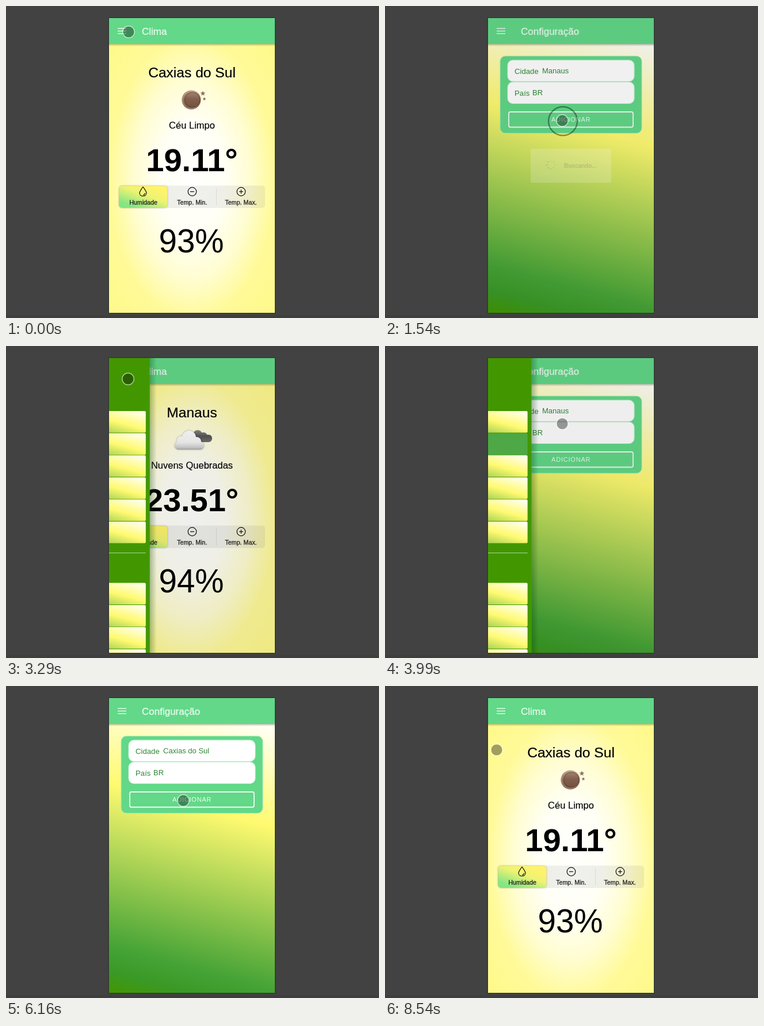
Animation, 648 px wide and 542 px high, one loop 8610 ms. Source, as an HTML page with a canvas:

```html
<!DOCTYPE html>
<html lang="pt-BR">
<head>
<meta charset="utf-8">
<title>Clima</title>
<style>
html, body { margin: 0; width: 100%; height: 100%; overflow: hidden; background: #424242; }
canvas { display: block; }
</style>
</head>
<body>
<canvas id="stage" width="648" height="542"></canvas>
<script>
const ctx = document.getElementById('stage').getContext('2d');
const LOOP = 8610, STEP = 70;
const L = 179, T = 21, W = 288, H = 512, MID = 323, TOP = 66;
const SANS = '"Liberation Sans", Arial, sans-serif';
const GREEN = '#62d888', DEEP = '#429700', INK = '#2f8a35';
const MENU_W = 243;

const clamp = v => Math.max(0, Math.min(1, v));
const ease = v => { v = clamp(v); return v * v * (3 - 2 * v); };
const ramp = (t, from, len) => ease((t - from) / len);
const fade = (t, a, b) => clamp((t - a) / 100) * (1 - clamp((t - b) / 150));
const last = (list, t) => list.filter(e => e[0] <= t).pop();

// time, x, y; a time without a place hides the pointer
const path = [
  [0, 213, 45], [70, 203, 44], [140, 210, 60], [280, 290, 171], [350, 290, 171],
  [490, 310, 135], [560, 312, 115], [630],
  [1190, 330, 160], [1400, 308, 199], [1540, 308, 199], [1820, 350, 190],
  [2030, 324, 325], [2170, 324, 325], [2310, 410, 325], [2450, 410, 325],
  [2660, 238, 325], [2800, 238, 325], [3080, 203, 44], [3220, 203, 44],
  [3570, 290, 171], [3810, 290, 171], [3990, 308, 135], [4130, 312, 114],
  [4270, 312, 114], [4280],
  [5880, 330, 150], [6160, 308, 199], [6300, 308, 199], [6720, 357, 187],
  [7070, 324, 325], [7210, 324, 325], [7350, 410, 325], [7490, 410, 325],
  [7700, 238, 325], [7840, 238, 325], [8190, 220, 215], [8540, 194, 111], [8610, 213, 45]
];
const clicks = [70, 350, 560, 1470, 2100, 2310, 2730, 3150, 3780, 4200, 6230, 7140, 7420, 7770];
const tabs = [[-999, 0], [2170, 1], [2380, 2], [2800, 0], [7210, 1], [7490, 2], [7840, 0]];
const views = [[0, 'clima'], [385, 'config'], [1610, 'clima'], [3814, 'config'], [6510, 'clima']];
const drawers = [[100, 385, 150], [3190, 3814, 280]];
const loads = [[1520, 1700], [6300, 6600]];
const places = {
  caxias: { name: 'Caxias do Sul', sky: 'Céu Limpo', temp: '19.11°', values: ['93%', '19°', '19°'], icon: moon },
  manaus: { name: 'Manaus', sky: 'Nuvens Quebradas', temp: '23.51°', values: ['94%', '23°', '24°'], icon: clouds }
};

function text(str, x, y, size, color, o = {}) {
  ctx.font = `${o.weight || 400} ${size}px ${SANS}`;
  ctx.textAlign = o.align || 'left';
  ctx.letterSpacing = (o.space || 0) + 'px';
  ctx.fillStyle = color;
  ctx.fillText(str, x, y);
  if (o.thick) {
    ctx.strokeStyle = color;
    ctx.lineWidth = o.thick;
    ctx.strokeText(str, x, y);
  }
  ctx.letterSpacing = '0px';
}

function box(x, y, w, h, r, fill, stroke, lw = 1) {
  ctx.beginPath();
  ctx.roundRect(x, y, w, h, r);
  if (fill) { ctx.fillStyle = fill; ctx.fill(); }
  if (stroke) { ctx.strokeStyle = stroke; ctx.lineWidth = lw; ctx.stroke(); }
}

function disc(x, y, r, fill) {
  ctx.beginPath();
  ctx.arc(x, y, r, 0, 7);
  ctx.fillStyle = fill;
  ctx.fill();
}

function ring(x, y, r, color, lw) {
  ctx.beginPath();
  ctx.arc(x, y, r, 0, 7);
  ctx.strokeStyle = color;
  ctx.lineWidth = lw;
  ctx.stroke();
}

function line(x1, y1, x2, y2, color, lw) {
  ctx.beginPath();
  ctx.moveTo(x1, y1);
  ctx.lineTo(x2, y2);
  ctx.strokeStyle = color;
  ctx.lineWidth = lw;
  ctx.stroke();
}

function stops(g, list) {
  list.forEach(([at, c]) => g.addColorStop(at, c));
  return g;
}

const vertical = (y1, y2, list) => stops(ctx.createLinearGradient(0, y1, 0, y2), list);

// white, yellow and green, falling to the lower left
function meadow(x, y, w, h) {
  const sx = 0.26, sy = 0.966, half = (w * sx + h * sy) / 2;
  const cx = x + w / 2, cy = y + h / 2;
  return stops(ctx.createLinearGradient(cx + sx * half, cy - sy * half, cx - sx * half, cy + sy * half),
    [[0, '#fffffb'], [0.33, '#fffa70'], [0.85, '#45a336'], [0.93, '#3a9926'], [1, DEEP]]);
}

function header(title) {
  ctx.fillStyle = vertical(TOP, TOP + 4, [[0, 'rgba(60,80,40,.35)'], [1, 'rgba(60,80,40,0)']]);
  ctx.fillRect(L, TOP, W, 4);
  ctx.fillStyle = GREEN;
  ctx.fillRect(L, T, W, TOP - T);
  for (const y of [39, 43.5, 48]) line(194, y, 209, y, '#e2f8e9', 1.5);
  text(title, 236, 50, 17, '#e6f9ec', { thick: 0.35 });
}

function star(x, y, r) {
  ctx.beginPath();
  for (let i = 0; i < 10; i++) {
    const a = i * Math.PI / 5 - Math.PI / 2, d = i % 2 ? r * 0.45 : r;
    ctx.lineTo(x + d * Math.cos(a), y + d * Math.sin(a));
  }
  ctx.fillStyle = '#8b7364';
  ctx.fill();
}

function moon() {
  disc(322, 163, 16.5, vertical(146, 180, [[0, '#b99a84'], [0.5, '#8a6651'], [1, '#6d4c3c']]));
  ring(322, 163, 15, '#c5ab98', 1);
  disc(324, 163, 13.5, vertical(149, 177, [[0, '#a58570'], [0.45, '#82604e'], [1, '#74513f']]));
  ring(324, 163, 13, 'rgba(80,52,38,.6)', 1);
  star(342, 152, 4.5);
  star(344.5, 161.5, 3.2);
}

function cloud(parts, base, fill) {
  ctx.beginPath();
  for (const [x, y, r] of parts) {
    ctx.moveTo(x + r, y);
    ctx.arc(x, y, r, 0, Math.PI * 2);
  }
  ctx.roundRect(...base);
  ctx.fillStyle = fill;
  ctx.fill();
}

function clouds() {
  cloud([[333, 154, 8], [343, 157, 7]], [322, 154, 36, 13, 6],
    vertical(146, 168, [[0, '#8a8a8a'], [0.5, '#555'], [1, '#747474']]));
  ctx.save();
  ctx.shadowColor = 'rgba(0,0,0,.35)';
  ctx.shadowBlur = 3;
  cloud([[318, 159, 12], [304, 164, 7.5], [331, 166, 8]], [293, 166, 51, 14, 7],
    vertical(147, 181, [[0, '#fff'], [0.6, '#f4f4f4'], [0.85, '#d2d2d2'], [1, '#a5a5a5']]));
  ctx.restore();
}

function drop(x, y) {
  ctx.beginPath();
  ctx.moveTo(x, y - 8);
  ctx.bezierCurveTo(x + 3, y - 3, x + 6, y, x + 6, y + 3);
  ctx.bezierCurveTo(x + 6, y + 10, x - 6, y + 10, x - 6, y + 3);
  ctx.bezierCurveTo(x - 6, y, x - 3, y - 3, x, y - 8);
  ctx.strokeStyle = '#111';
  ctx.lineWidth = 1.2;
  ctx.stroke();
  ctx.beginPath();
  ctx.arc(x, y + 3, 3.4, 0, 1.5);
  ctx.stroke();
}

function sign(x, y, plus) {
  ring(x, y, 7.3, '#111', 1.2);
  line(x - 3.5, y, x + 3.5, y, '#111', 1.2);
  if (plus) line(x, y - 3.5, x, y + 3.5, '#111', 1.2);
}

function segments(t) {
  const now = last(tabs, t), prev = tabs[Math.max(0, tabs.indexOf(now) - 1)];
  const pos = prev[1] + (now[1] - prev[1]) * ramp(t + STEP, now[0], 140);
  const x = 196 + pos * 84.7;
  box(196, 312, 254, 39, 5, 'rgba(60,60,70,.08)');
  line(365.5, 317, 365.5, 346, 'rgba(0,0,0,.09)', 1);
  ctx.save();
  ctx.shadowColor = 'rgba(0,0,0,.3)';
  ctx.shadowBlur = 3;
  box(x + 0.5, 312.5, 84, 38, 5, stops(ctx.createLinearGradient(x + 50, 310, x + 34, 353),
    [[0, '#fff36c'], [0.4, '#eef373'], [1, '#83e583']]));
  ctx.restore();
  drop(238, 322);
  sign(323.5, 322.5, false);
  sign(408.5, 322.5, true);
  ['Humidade', 'Temp. Min.', 'Temp. Max.'].forEach((s, i) =>
    text(s, 238.5 + i * 84.8, 345, 10.7, '#222', { align: 'center', thick: 0.3 }));
  return now[1];
}

function clima(t) {
  ctx.save();
  ctx.translate(MID, 300);
  ctx.scale(204, 350);
  ctx.fillStyle = stops(ctx.createRadialGradient(0, 0, 0, 0, 0, 1),
    [[0, '#fffffd'], [0.28, '#fffff6'], [0.5, '#fffdd0'], [0.7, '#fffa98'], [1, '#fff988']]);
  ctx.fillRect(-1, -1, 2, 2);
  ctx.restore();
  const place = t >= 1610 && t < 6510 ? places.manaus : places.caxias;
  const ready = !(t >= 1610 && t < 1890) && !(t >= 6510 && t < 6860);
  const mid = { align: 'center' };
  text(place.name, MID, 124, 24.6, '#000', { align: 'center', thick: 0.2 });
  if (ready) place.icon();
  ctx.save();
  if (!ready) ctx.translate(0, -32);
  text(place.sky, MID, 213, 16.5, '#000', { align: 'center', thick: 0.15 });
  text(place.temp, MID, 287, 56, '#000', { align: 'center', weight: 700 });
  const tab = segments(t);
  text(place.values[tab], MID - 1, 428, 56.5, '#000', mid);
  ctx.restore();
  header('Clima');
}

// the field is cleared and typed again on each visit
function city(t) {
  const a = 'Manaus', b = 'Caxias do Sul';
  const typed = (s, from) => s.slice(0, Math.max(0, Math.floor((t - from) / STEP) + 1));
  if (t < 630) return b;
  if (t < 3000) return typed(a, 770);
  if (t < 4900) return a.slice(0, 6 - Math.max(0, Math.floor((t - 4340) / STEP)));
  return typed(b, 4900);
}

function config(t) {
  ctx.fillStyle = meadow(L, TOP, W, T + H - TOP);
  ctx.fillRect(L, T, W, H);
  box(200, 87, 246, 134, 9, GREEN, '#a8ecb5');
  box(213, 94, 220, 37, 9, '#fff', '#c3f1d1');
  box(213, 132, 220, 37.5, 9, '#fff', '#c3f1d1');
  const value = city(t);
  text('Cidade', 225, 118, 13.2, INK);
  text(value, 273, 117, 13, INK);
  const focus = (t >= 630 && t < 1470) || (t >= 4200 && t < 6160);
  if (focus) {
    const x = Math.round(273 + ctx.measureText(value).width) + 0.5;
    line(x, 105, x, 120, INK, 1);
  }
  text('País', 225, 156, 13.2, INK);
  text('BR', 256, 155, 13, INK);
  box(215, 184, 216, 26.5, 3, null, '#f0fbf3', 1.8);
  text('ADICIONAR', 289, 201, 11, '#f0fbf3', { space: 0.8 });
  header('Configuração');
}

function shade(alpha) {
  ctx.fillStyle = `rgba(0,0,0,${alpha})`;
  ctx.fillRect(L, T, W, H);
}

function drawer(t) {
  for (const [open, close, len] of drawers) {
    const shown = ramp(t, open, len) * (1 - ramp(t, close, len));
    if (shown <= 0) continue;
    shade(0.22 * shown);
    const x = L + MENU_W * (shown - 1), right = x + MENU_W;
    ctx.fillStyle = stops(ctx.createLinearGradient(right, 0, right + 12, 0),
      [[0, 'rgba(0,60,0,.3)'], [1, 'rgba(0,60,0,0)']]);
    ctx.fillRect(right, T, 12, H);
    ctx.fillStyle = DEEP;
    ctx.fillRect(x, T, MENU_W, H);
    const row = (y, label, active) => {
      box(x + 7, y, MENU_W - 14, 37.5, 2, active ? '#4da845' : meadow(x + 7, y, MENU_W - 14, 37.5));
      if (label) text(label, x + 20, y + 23, 13, active ? '#fff' : INK);
    };
    for (let i = 0; i < 6; i++) {
      row(113 + i * 38.4, ['Clima', 'Configuração'][i], i === 1 && t >= close - 40);
    }
    line(x + 7, 359.5, right - 7, 359.5, '#b5d69c', 1);
    for (let i = 0; i < 4; i++) row(411.5 + i * 38.4, ['Caxias do Sul', 'Manaus'][i]);
  }
}

function loading(t) {
  for (const [from, until] of loads) {
    const a = fade(t, from, until);
    if (a <= 0) continue;
    shade(0.3 * a);
    ctx.save();
    ctx.globalAlpha = a;
    box(253, 248, 140, 59, 2, '#f6f6f6');
    const turn = Math.floor(t / STEP);
    for (let i = 0; i < 8; i++) {
      const k = i * Math.PI / 4;
      disc(288 + 7 * Math.cos(k), 276 + 7 * Math.sin(k), 1.3, `rgba(70,70,70,${0.2 + 0.1 * ((i + 16 - turn % 8) % 8)})`);
    }
    text('Buscando...', 311, 281, 10, '#444', { weight: 700 });
    ctx.restore();
  }
}

function pointer(t) {
  const i = path.indexOf(last(path, t)), a = path[i], b = path[i + 1];
  if (a.length < 3) return;
  const k = b && b.length > 2 ? ramp(t, a[0], b[0] - a[0]) : 0;
  const x = a[1] + (k && (b[1] - a[1]) * k), y = a[2] + (k && (b[2] - a[2]) * k);
  disc(x, y, 9.8, 'rgba(0,0,0,.37)');
  ring(x, y, 10.2, 'rgba(255,255,255,.55)', 1.5);
  const hit = clicks.find(c => t >= c && t < c + 2 * STEP);
  if (hit !== undefined) {
    ctx.globalAlpha = t < hit + STEP ? 1 : 0.4;
    ring(x + 1, y + 1, t < hit + STEP ? 20.3 : 25, '#000', 2.3);
    ctx.globalAlpha = 1;
  }
}

function draw(t) {
  ctx.fillStyle = '#424242';
  ctx.fillRect(0, 0, 648, 542);
  ctx.fillStyle = '#3e3e3e';
  ctx.fillRect(0, 537, 648, 5);
  box(L - 0.5, T - 0.5, W + 1, H + 1, 0, null, '#333a32', 2);
  ctx.save();
  ctx.beginPath();
  ctx.rect(L, T, W, H);
  ctx.clip();
  (last(views, t)[1] === 'clima' ? clima : config)(t);
  drawer(t);
  loading(t);
  pointer(t);
  ctx.restore();
}

const start = performance.now();
function tick() {
  const t = (performance.now() - start) % LOOP;
  draw(Math.floor(t / STEP) * STEP);
  requestAnimationFrame(tick);
}
tick();
</script>
</body>
</html>
```
